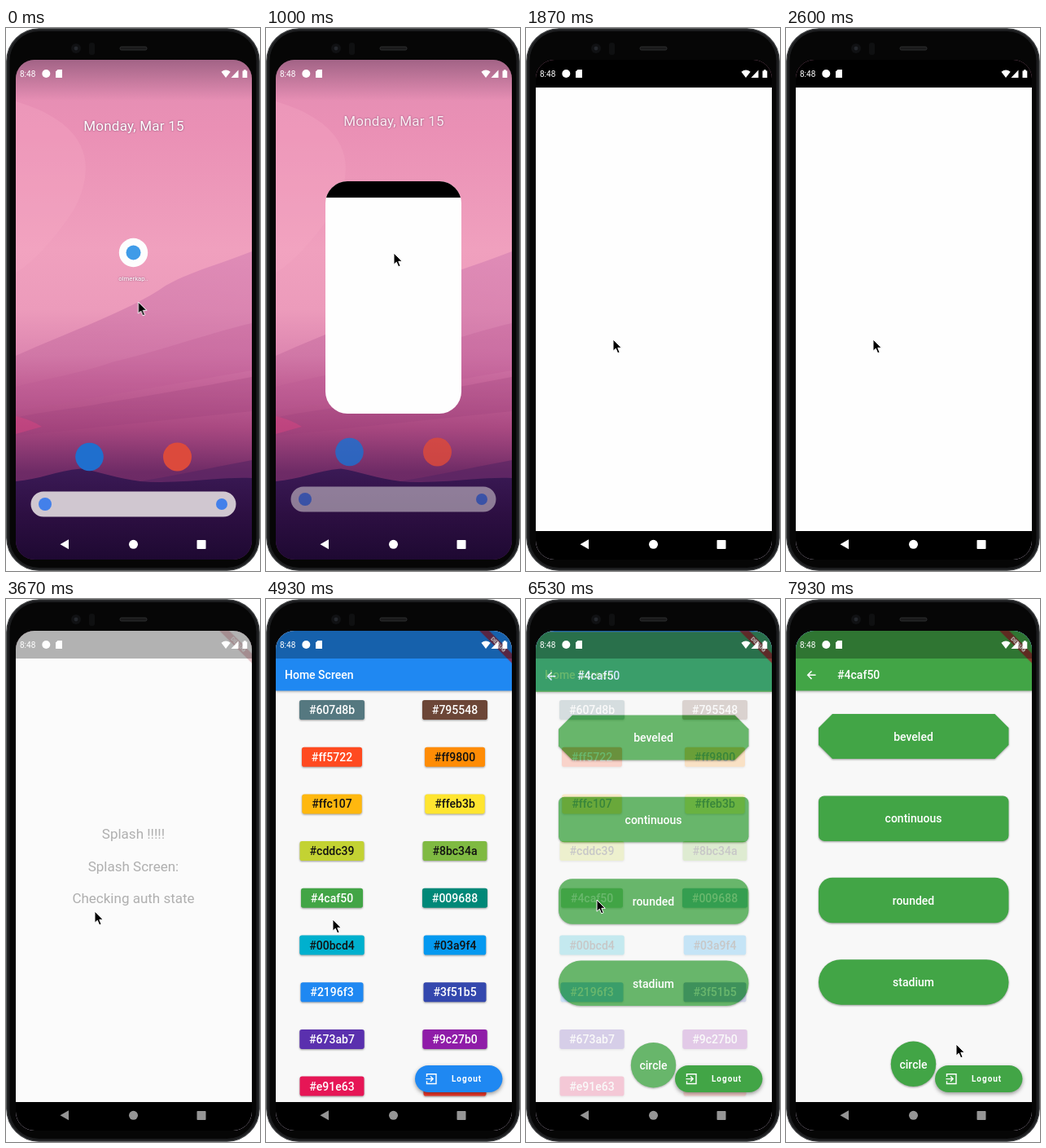
Animation of 312 by 666 pixels, one loop 8 s. Source, as an HTML page:

```html
<!DOCTYPE html>
<html lang="en">
<head>
<meta charset="utf-8">
<title>Phone demo</title>
<style>
html, body { margin: 0; width: 100%; height: 100%; overflow: hidden; background: #fff; }
body { position: relative; font-family: Roboto, "Noto Sans", sans-serif; }
svg { position: absolute; left: 0; top: 0; display: block; }
#screen { position: absolute; left: 12px; top: 39px; width: 290px; height: 613px;
  border-radius: 23px; overflow: hidden; }
#win { position: absolute; overflow: hidden; background: #fefefe; opacity: 0; }
#win i { display: block; padding-top: 11.6%; background: #000; }
text { font-family: Roboto, "Noto Sans", sans-serif; }
.mid { text-anchor: middle; }
.btn { font-size: 14px; font-weight: 500; }
.lift { filter: drop-shadow(0 1.2px 1.2px rgba(0,0,0,.38)); }
.bar { filter: drop-shadow(0 1px 1.5px rgba(0,0,0,.35)); }
#soft { filter: drop-shadow(0 .5px 1.2px rgba(60,20,60,.6)); }
#fab { filter: drop-shadow(0 2px 2.5px rgba(0,0,0,.4)); }
</style>
</head>
<body>
<svg id="phone" width="312" height="666">
  <rect x=".8" y=".8" width="310.400" height="664.400" rx="40" fill="#1c1d1f" stroke="#3f4143" stroke-width="1.200"/>
  <rect x="4.500" y="4" width="303" height="658" rx="36" fill="#060606"/>
  <circle cx="86" cy="25" r="6" fill="#101113"/>
  <circle cx="86" cy="25" r="2.400" fill="#24272c"/>
  <rect x="102" y="18" width="7" height="15" rx="3" fill="#0f1011"/>
  <rect x="140" y="23" width="33" height="4" rx="1.800" fill="#19191a" stroke="#343536" stroke-width=".8"/>
</svg>

<div id="screen">
  <svg width="290" height="613" viewBox="12 39 290 613">
    <defs>
      <linearGradient id="sky" x2="0" y2="1">
        <stop offset="0" stop-color="#e28db3"/><stop offset=".14" stop-color="#ea90b5"/>
        <stop offset=".38" stop-color="#f0a0be"/><stop offset=".5" stop-color="#ec9bbb"/>
        <stop offset=".59" stop-color="#dd86b0"/><stop offset=".64" stop-color="#cb6a9c"/>
        <stop offset=".735" stop-color="#a8477f"/><stop offset=".825" stop-color="#6e2b66"/>
        <stop offset="1" stop-color="#5a2460"/>
      </linearGradient>
      <linearGradient id="dune" x1="1" y1="0" x2=".8" y2="1">
        <stop offset="0" stop-color="#cf78b0"/><stop offset=".5" stop-color="#c4689f"/>
        <stop offset="1" stop-color="#a3457f" stop-opacity="0"/>
      </linearGradient>
      <linearGradient id="night" x2="0" y2="1">
        <stop offset="0" stop-color="#3b1a56"/><stop offset=".5" stop-color="#2d0f42"/>
        <stop offset="1" stop-color="#1e0932"/>
      </linearGradient>
      <linearGradient id="scrim" x2="0" y2="1">
        <stop offset="0" stop-color="#4a2a48" stop-opacity=".42"/><stop offset="1" stop-color="#4a2a48" stop-opacity="0"/>
      </linearGradient>
    </defs>
    <rect x="12" y="39" width="290" height="613" fill="url(#sky)"/>
    <path d="M12 90C80 110 120 150 85 220C60 260 30 290 12 300Z" fill="#f6a9c3" opacity=".3"/>
    <path d="M302 274C262 290 228 298 196 316C150 348 78 372 12 402V540H302Z" fill="url(#dune)" opacity=".5"/>
    <path d="M302 362C250 374 190 396 130 410C90 424 50 430 12 440V470L302 420Z" fill="#b9568f" opacity=".25"/>
    <path d="M302 428C240 440 180 450 120 460C80 468 44 470 12 478V500L302 470Z" fill="#963c78" opacity=".25"/>
    <path d="M12 476Q30 480 44 489L12 498Z" fill="#d8447f" opacity=".5"/>
    <path d="M302 530C250 540 210 548 165 556L302 560Z" fill="#552463" opacity=".6"/>
    <path d="M12 556C40 554 62 543 92 540.500C115 544 138 553 165 556C215 560 260 550 302 552V652H12Z" fill="url(#night)"/>
    <rect x="12" y="39" width="290" height="50" fill="url(#scrim)"/>
    <g id="home">
      <g id="soft" fill="#fff" class="mid">
        <text x="157" y="126" font-size="17" letter-spacing=".2">Monday, Mar 15</text>
        <text x="156.500" y="309.500" font-size="7.800">olmerkap..</text>
      </g>
      <g id="icon">
        <circle cx="156.500" cy="275.500" r="17.700" fill="#fdfdfd"/>
        <circle cx="156.500" cy="275.500" r="9" fill="#3f9be8"/>
      </g>
      <circle cx="102.500" cy="526" r="17.300" fill="#1f6fce"/>
      <circle cx="210.500" cy="526" r="17.500" fill="#dc4a3c"/>
      <g id="search">
        <rect x="30.500" y="568.500" width="252" height="31" rx="15.500" fill="#d0c7d0"/>
        <circle cx="48" cy="584" r="8" fill="#4380ea"/>
        <circle cx="265" cy="584" r="7" fill="#4380ea"/>
      </g>
    </g>
  </svg>

  <div id="win"><i></i></div>

  <svg width="290" height="613" viewBox="12 39 290 613">
    <rect id="base" x="12" y="39" width="290" height="578" fill="#fbfbfb" opacity="0"/>
    <g id="splash" opacity="0" font-size="17" fill="#111" class="mid">
      <text x="156.500" y="294">Splash !!!!!</text>
      <text x="156.500" y="333.500">Splash Screen:</text>
      <text x="156.500" y="373">Checking auth state</text>
    </g>
    <g id="list" opacity="0"></g>
    <g id="detail" opacity="0"></g>
    <g id="fab" opacity="0">
      <rect id="pill" x="183" y="572" width="107.500" height="33" rx="16.500"/>
      <g fill="none" stroke="#fff" stroke-width="1.400">
        <path d="M197.500 586V582.700H209V594.500H197.500V591.200M196.500 588.600H205M202 585.400L205.200 588.600L202 591.800"/>
      </g>
      <text x="228" y="592.300" font-size="10" font-weight="700" letter-spacing=".95" fill="#fff">Logout</text>
    </g>
    <g id="banner" opacity="0">
      <g transform="translate(302 39) rotate(45) scale(.702)">
        <rect x="-44" y="28" width="88" height="12" fill="#a01624" opacity=".72"/>
        <text class="mid" y="37.600" font-size="10.200" font-weight="900" fill="#fff">DEBUG</text>
      </g>
    </g>
    <rect id="shade" x="12" y="39" width="290" height="34" fill="#000" opacity="0"/>
    <rect id="navbar" x="12" y="617" width="290" height="36" fill="#000" opacity="0"/>
    <g fill="#fff">
      <text x="17" y="59.700" font-size="10">8:48</text>
      <circle cx="49.300" cy="56" r="5"/>
      <path d="M63.500 51H69V61H61V53.500Z"/>
      <path d="M264.500 53.800Q270 49.200 275.700 53.800L270 61Z"/>
      <path d="M285.500 51.500V61H276.500Z"/>
      <path d="M290.500 52.500H292V51.300H294.800V52.500H296.300V61H290.500Z"/>
    </g>
    <g id="keys" fill="#fff">
      <path d="M66.500 633.300L77 627.300V639.300Z"/>
      <circle cx="156.500" cy="633.300" r="5.500"/>
      <rect x="234.500" y="628" width="11" height="11" rx=".8"/>
    </g>
  </svg>
</div>

<svg width="312" height="666">
  <path id="cursor" d="M0 0V14.200L3.300 11.200L5.700 16.800L8.100 15.800L5.800 10.300H10.300Z"
    fill="#000" stroke="#fff" stroke-width="1" stroke-linejoin="round"/>
</svg>

<script>
const LOOP = 8000;
const BLUE = '#1f88f2', GREEN = '#42a546';
const $ = id => document.getElementById(id);

const label = (x, y, str, fill) =>
  `<text class="mid btn" x="${x}" y="${y}" fill="${fill}">${str}</text>`;
const page = (color, bar, body) =>
  `<rect x="12" y="39" width="290" height="580" fill="#f8f8f8"/>${body}` +
  `<rect class="bar" x="12" y="39" width="290" height="73.500" fill="${color}"/>${bar}`;

// name, painted colour, dark text
const swatches = [
  ['607d8b', '#557880'], ['795548', '#6c4637'], ['ff5722', '#ff4a20'], ['ff9800', '#ff8c05', 1],
  ['ffc107', '#ffb80f', 1], ['ffeb3b', '#ffe530', 1], ['cddc39', '#c3d233', 1], ['8bc34a', '#7fba42', 1],
  ['4caf50', GREEN], ['009688', '#008878'], ['00bcd4', '#00b0ce', 1], ['03a9f4', '#0599f0', 1],
  ['2196f3', BLUE], ['3f51b5', '#3448ae'], ['673ab7', '#5a30ae'], ['9c27b0', '#8f1ca8'],
  ['e91e63', '#e61656'], ['f44336', '#f53a2c']
];

function swatch([name, color, dark], i) {
  const x = i % 2 ? 232 : 81, y = 136 + 57.7 * (i >> 1);
  const count = re => (name.match(re) || []).length;
  const w = 80 - 3 * count(/f/g) - 0.5 * count(/[ace]/g);
  return `<rect class="lift" x="${x - w / 2}" y="${y - 12}" width="${w}" height="24" rx="2.800" fill="${color}"/>` +
    label(x, y + 5, '#' + name, dark ? '#111' : '#fff');
}

$('list').innerHTML = page(BLUE,
  '<text class="btn" x="23" y="98" fill="#fff">Home Screen</text>',
  swatches.map(swatch).join(''));

const shapes = [
  ['beveled', y => `<path d="M57 ${y}H256.500L273.500 ${y + 17}V${y + 38}L256.500 ${y + 55}H57L40 ${y + 38}V${y + 17}Z"/>`],
  ['continuous', y => block(y, 7)],
  ['rounded', y => block(y, 17)],
  ['stadium', y => block(y, 27.5)],
  ['circle', y => `<circle cx="156.500" cy="${y + 27.7}" r="27.700"/>`]
];
function block(y, r) {
  return `<rect x="40" y="${y}" width="233.500" height="55.500" rx="${r}"/>`;
}

$('detail').innerHTML = page(GREEN,
  '<path d="M36.500 93.300H27M31.500 88.500L26.700 93.300L31.500 98.100" fill="none" stroke="#fff" stroke-width="1.500"/>' +
  '<text class="btn" x="63" y="98" fill="#fff">#4caf50</text>',
  shapes.map(([name, draw], i) => {
    const y = 141 + 100.4 * i;
    return `<g class="lift" fill="${GREEN}">${draw(y)}</g>` + label(156.5, y + 33, name, '#fff');
  }).join(''));

// steps: [ms, properties, easing to the next step]
function play(id, steps) {
  const first = steps[0], last = steps[steps.length - 1];
  const all = [...steps];
  if (first[0] > 0) all.unshift([0, first[1]]);
  if (last[0] < LOOP) all.push([LOOP, last[1]]);
  $(id).animate(all.map(([t, props, easing = 'linear']) => ({ offset: t / LOOP, easing, ...props })),
    { duration: LOOP, iterations: Infinity });
}
const move = (x, y) => ({ transform: `translate(${x}px, ${y}px)` });
const fade = (id, t0, t1, from, to, easing) =>
  play(id, [[t0, { opacity: from }, easing], [t1, { opacity: to }]]);
const flip = (id, t, from, to) =>
  play(id, [[0, from, 'step-end'], [t, to]]);

// A page rises by a quarter of its height while it fades in.
function rise(id, t) {
  fade(id, t, t + 300, 0, 1, 'cubic-bezier(.42,0,1,1)');
  play(id, [[t, move(0, 144), 'cubic-bezier(.4,0,.2,1)'], [t + 300, move(0, 0)]]);
}

const box = (left, top, width, height, r, opacity = 1) => ({
  left: left + 'px', top: top + 'px', width: width + 'px', height: height + 'px',
  borderRadius: r + 'px', opacity
});

// Launching the app
play('win', [
  [835, box(126.5, 218.5, 36, 36, 18, 0)],
  [865, box(123, 211, 43, 48, 19), 'cubic-bezier(.4,0,.8,.8)'],
  [1002, box(61, 149, 167, 286, 27), 'cubic-bezier(.3,.4,.3,1)'],
  [1270, box(0, 0, 290, 613, 0)]
]);
play('home', [
  [835, { ...move(0, 0), opacity: 1 }],
  [1000, { ...move(0, -6), opacity: .85 }],
  [1180, { ...move(0, -12), opacity: 0 }]
]);
fade('search', 835, 1000, 1, .7);
fade('icon', 835, 900, 1, 0);
fade('navbar', 1130, 1270, 0, 1);

// Splash, list and detail
const READY = 3510, LIST = 4430, DETAIL = 6270;
flip('base', READY, { opacity: 0 }, { opacity: 1 });
flip('shade', READY, { opacity: 0 }, { opacity: .29 });
flip('keys', READY, { fill: '#fff' }, { fill: '#959595' });
fade('splash', READY, READY + 500, 0, 1);
fade('banner', READY, READY + 500, 0, 1);
rise('list', LIST);
fade('fab', LIST, LIST + 300, 0, 1, 'cubic-bezier(.42,0,1,1)');
rise('detail', DETAIL);
flip('pill', DETAIL, { fill: BLUE }, { fill: GREEN });

const path = [
  [0, 162.5, 336], [70, 162.5, 336, 1], [650, 157, 276], [1130, 157, 276, 1], [1800, 107, 382],
  [3230, 107, 382], [3330, 108.5, 383], [3670, 109, 383], [4330, 100, 388, 1], [4800, 82, 393],
  [4960, 82, 393, 1], [5200, 150, 394.5], [5270, 155, 394.5], [5400, 155, 394.5], [5470, 157, 394.5],
  [5670, 157, 394.5, 1], [6130, 87, 369], [6600, 87, 369, 1], [7870, 209, 546]
];
play('cursor', path.map(([t, x, y, glide]) => [t, move(x, y), glide ? 'ease-in-out' : 'linear']));
</script>
</body>
</html>
```
